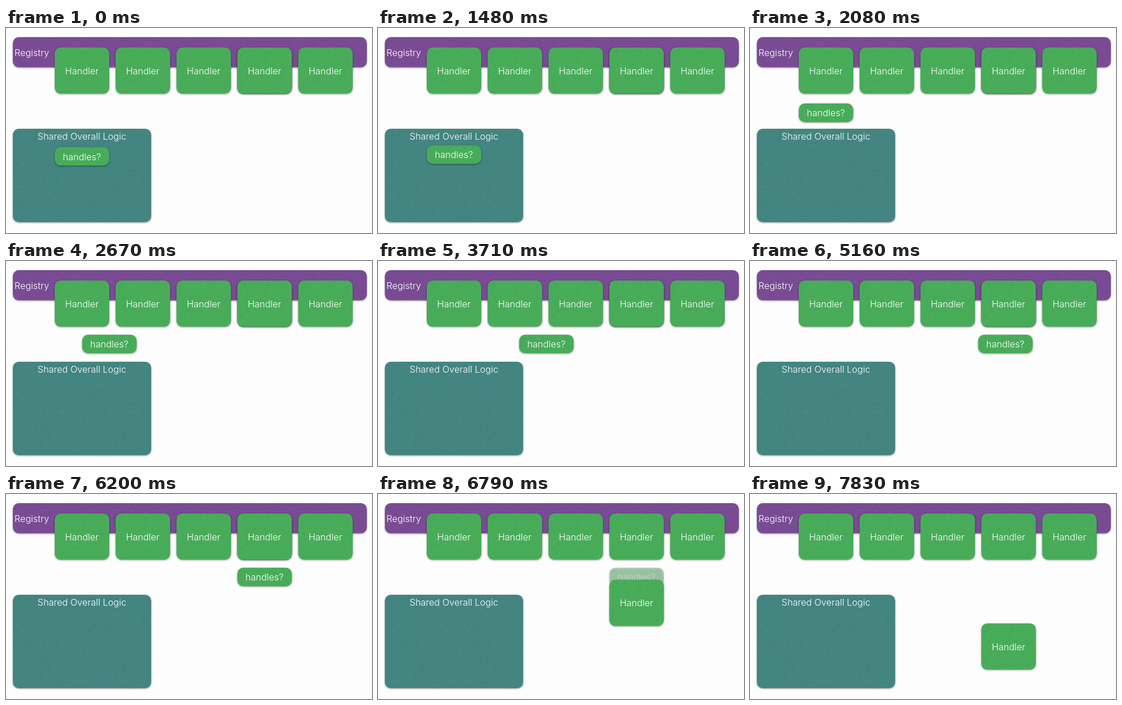
Recreate the animation shown at these times as an HTML page with a canvas. Size 638x358 px, loop 8 s.

```html
<!DOCTYPE html>
<html lang="en">
<head>
<meta charset="utf-8">
<title>Handler registry</title>
<style>
  html, body { margin: 0; height: 100%; overflow: hidden; background: #fdfdfd; }
  canvas { display: block; }
</style>
</head>
<body>
<canvas id="stage" width="638" height="358"></canvas>
<script>
const ctx = document.getElementById('stage').getContext('2d');
const LOOP = 8000, FIRST_HOLD = 300, STEP = 147.7;
const GREEN = '#48ac59', PURPLE = '#794b94', TEAL = '#438580';
const MOVE = 991, ASK_START = 1208, DROP_START = 6090;
const COLUMN = 106.1;

const clamp = v => Math.max(0, Math.min(1, v));
const ease = (t, start) => (1 - Math.cos(Math.PI * clamp((t - start) / MOVE))) / 2;

// Faint paper grain shared by all cards
function makeGrain() {
  const tile = document.createElement('canvas');
  tile.width = tile.height = 128;
  const g = tile.getContext('2d');
  let seed = 7;
  const rnd = () => (seed = seed * 16807 % 2147483647) / 2147483647;
  for (let i = 0; i < 700; i++) {
    g.fillStyle = rnd() < 0.6 ? 'rgba(0,0,0,.05)' : 'rgba(255,255,255,.04)';
    g.fillRect(rnd() * 128, rnd() * 128, 1 + rnd() * 3, 1);
  }
  return ctx.createPattern(tile, 'repeat');
}
const grain = makeGrain();

function card(x, y, w, h, color) {
  ctx.save();
  ctx.translate(x, y);
  ctx.beginPath();
  ctx.roundRect(0, 0, w, h, 10.5);
  ctx.shadowColor = 'rgba(0,0,0,.45)';
  ctx.shadowBlur = 3;
  ctx.shadowOffsetY = 1;
  ctx.fillStyle = color;
  ctx.fill();
  ctx.shadowColor = 'transparent';
  ctx.fillStyle = grain;
  ctx.fill();
  ctx.restore();
}

function label(text, x, baseline) {
  ctx.fillStyle = '#fff';
  ctx.fillText(text, x, baseline);
}

function handler(x, y) {
  card(x, y, 95, 80.5, GREEN);
  label('Handler', x + 47.3, y + 46.5);
}

function draw(t) {
  ctx.fillStyle = '#fdfdfd';
  ctx.fillRect(0, 0, 638, 358);
  ctx.font = '300 16px Inter, "Liberation Sans", sans-serif';
  ctx.textAlign = 'center';

  card(12, 16, 617, 52.5, PURPLE);
  label('Registry', 45, 48.5);
  card(12, 176, 241, 163, TEAL);
  label('Shared Overall Logic', 132.3, 194.5);
  for (let i = 0; i < 5; i++) handler(85 + COLUMN * i, 34);

  // The question rises, then visits one handler after another
  const rise = ease(t, ASK_START);
  let column = 0;
  for (let i = 1; i <= 3; i++) column += ease(t, ASK_START + MOVE * i);
  const drop = ease(t, DROP_START);
  const x = 85 + COLUMN * column, y = 208 - 79.3 * rise;
  ctx.globalAlpha = 1 - drop;
  card(x, y, 95, 32.3, GREEN);
  label('handles?', x + 47.3, y + 22.5);
  ctx.globalAlpha = 1;

  // The matching handler drops out of the registry
  handler(85 + COLUMN * 3, 34 + 192 * drop);
}

function frame(now) {
  const t = now % LOOP;
  const step = Math.floor((t - FIRST_HOLD) / STEP);
  draw(step < 0 ? 0 : FIRST_HOLD + step * STEP);
  requestAnimationFrame(frame);
}
requestAnimationFrame(frame);
</script>
</body>
</html>
```
